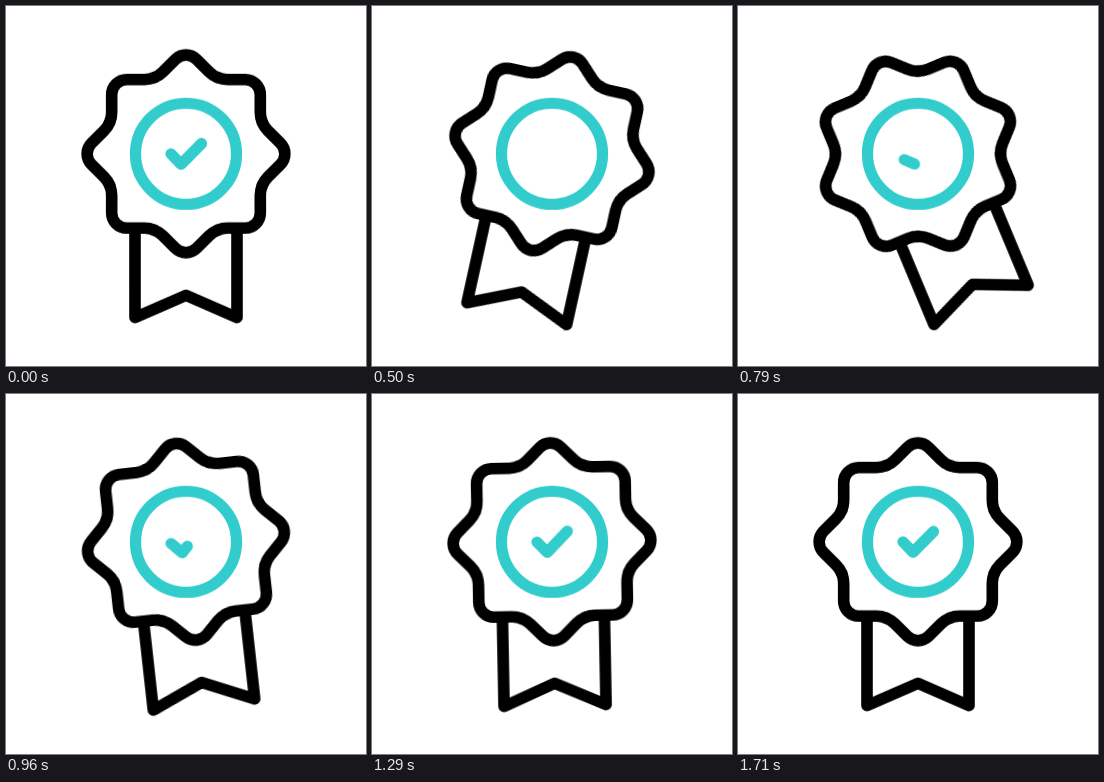
These frames come from a looping animation (360x360 px, 2.04 s). An HTML page without scripts:

```html
<!DOCTYPE html>
<html lang="en">
<head>
<meta charset="utf-8">
<title>Award badge</title>
<style>
  html, body { margin: 0; width: 100%; height: 100%; overflow: hidden; background: #fff; }
  svg { display: block; width: 100vw; height: 100vh; }
  .line { fill: none; stroke: #000; stroke-width: 11.6; stroke-linecap: round; stroke-linejoin: round; }
  .accent { stroke: #33cccc; stroke-width: 11.2; }
  .swing { animation: swing 2040ms cubic-bezier(.37, 0, .63, 1) infinite; }
  .check {
    stroke-dasharray: 1 2;
    animation: draw 2040ms linear infinite, blink 2040ms step-end infinite;
  }

  /* A damped pendulum around the badge centre */
  @keyframes swing {
    0%, 6.37% { transform: rotate(0deg); }
    25.25% { transform: rotate(12.45deg); }
    40.44% { transform: rotate(-23.7deg); }
    52.45% { transform: rotate(5.9deg); }
    68.14% { transform: rotate(-3deg); }
    83.82%, 100% { transform: rotate(0deg); }
  }
  @keyframes draw {
    0%, 6.37% { stroke-dashoffset: 0; }
    16.2%, 30.88% { stroke-dashoffset: .99; }
    62.25%, 100% { stroke-dashoffset: 0; }
  }
  /* Hides the round cap left over by an empty stroke */
  @keyframes blink {
    0% { opacity: 1; }
    18.6% { opacity: 0; }
    32.5%, 100% { opacity: 1; }
  }
</style>
</head>
<body>
<svg viewBox="0 0 360 360">
  <defs>
    <path id="point" d="M-31.59-76.28A26 26 0 0 0-23.16-81.92L-10.61-94.47A15 15 0 0 1 10.61-94.47L23.16-81.92A26 26 0 0 0 31.59-76.28"/>
    <g id="pair">
      <use href="#point"/>
      <use href="#point" transform="rotate(45)"/>
    </g>
  </defs>
  <g transform="translate(180 147.8)">
    <g class="swing">
      <path class="line" d="M-51 77V163.7L0 141.5L51 163.7V77"/>
      <g class="line">
        <use href="#pair"/>
        <use href="#pair" transform="rotate(90)"/>
        <use href="#pair" transform="rotate(180)"/>
        <use href="#pair" transform="rotate(270)"/>
      </g>
      <path class="line accent check" pathLength="1" d="M-15 0L-5 10.5L15.5-10.3"/>
    </g>
    <circle class="line accent" r="50.5"/>
  </g>
</svg>
</body>
</html>
```
